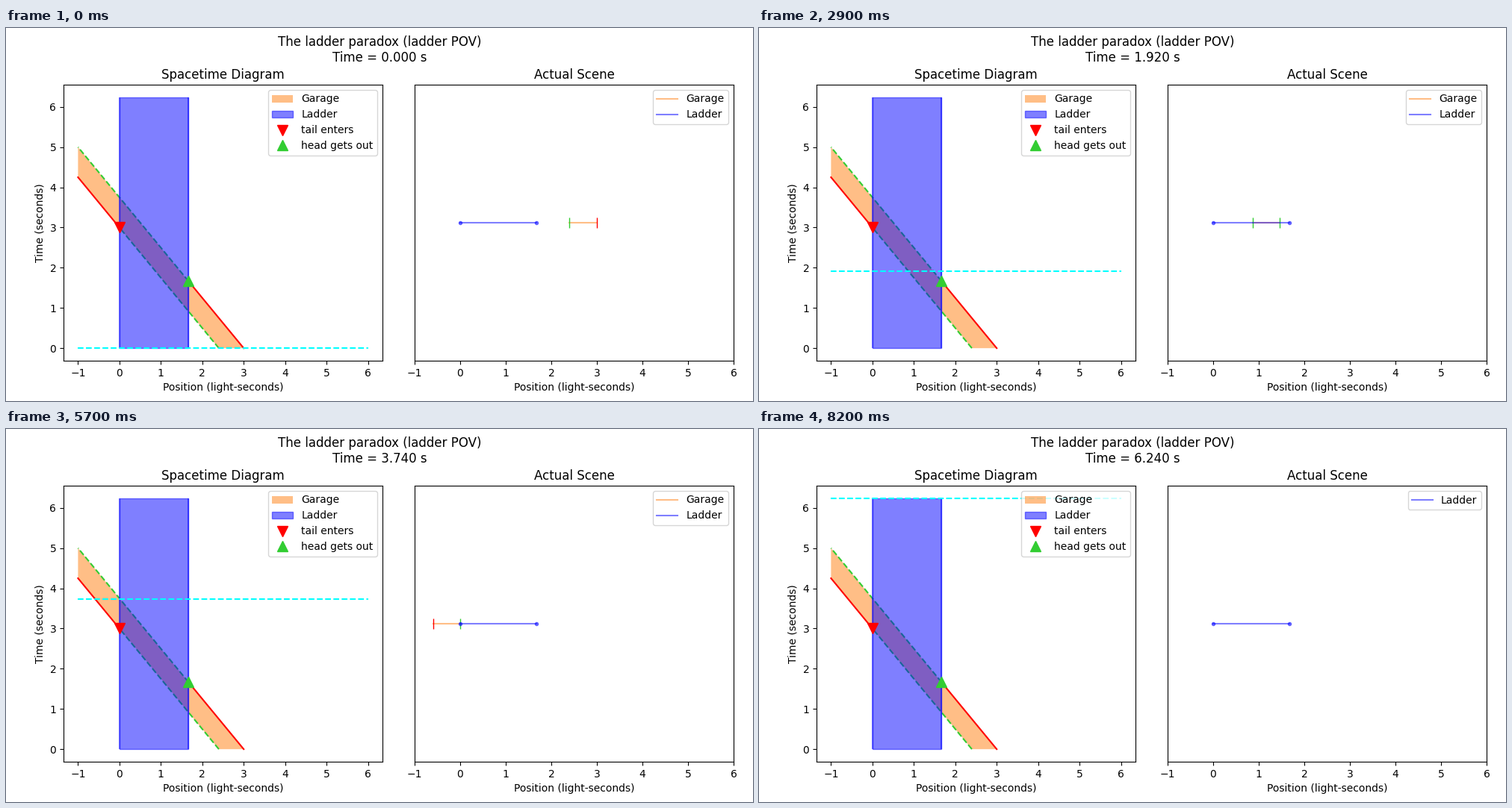
Recreate the animation shown at these times as a matplotlib script. Size 1000x500 px, loop 8220 ms.

```python
import matplotlib.pyplot as plt
from matplotlib.animation import FuncAnimation

W, H = 1000, 500
SPEED = 0.8
LADDER = 5 / 3            # ladder length at rest
ENTRY, EXIT = 2.4, 3.0    # garage doors at time zero
X_MIN, X_MAX = -1, 6
DT = 0.02
LAST = 312
HEAD_OUT, TAIL_IN = 83, 150   # steps at which the motion pauses
PAUSE = 49

GARAGE_COLOR = "tab:orange"
OPEN, SHUT = "limegreen", "red"

# Time step shown in every animation frame, with the two pauses
STEPS = sorted([*range(LAST + 1)] + [HEAD_OUT] * PAUSE + [TAIL_IN] * PAUSE)

plt.rcParams["font.family"] = "DejaVu Sans"
fig = plt.figure(figsize=(W / 100, H / 100), dpi=100)
heading = fig.suptitle("")


def panel(left, title):
    ax = fig.add_axes([left / W, 54 / H, 427 / W, 370 / H])
    ax.set_title(title, y=1.0)
    ax.set_xlabel("Position (light-seconds)")
    ax.set_xticks(range(X_MIN, X_MAX + 1))
    return ax


def event_marker(ax, x, y, shape, color, label):
    return ax.plot([x], [y], shape, color=color, markersize=10,
                   label=label, zorder=4)[0]


def freeze(axis):
    """Keep the laid-out ticks so that each redraw stays quick."""
    parts = [axis.label]
    for tick in axis.get_major_ticks():
        parts += [tick.tick1line, tick.label1]
    axis.draw = lambda renderer: [part.draw(renderer) for part in parts]


# Spacetime diagram
end = LAST * DT
diagram = panel(77, "Spacetime Diagram")
diagram.set_ylabel("Time (seconds)")
diagram.set_yticks(range(7))

entry_end = (ENTRY - X_MIN) / SPEED
exit_end = (EXIT - X_MIN) / SPEED
t_in = ENTRY / SPEED
t_out = (EXIT - LADDER) / SPEED

garage_area, = diagram.fill(
    [ENTRY, EXIT, X_MIN, X_MIN], [0, 0, exit_end, entry_end],
    facecolor=GARAGE_COLOR, edgecolor="none", alpha=0.5, label="Garage")
diagram.plot([ENTRY, 0], [0, t_in], "--", color=OPEN)
diagram.plot([0, X_MIN], [t_in, entry_end], color=SHUT)
diagram.plot([EXIT, LADDER], [0, t_out], color=SHUT)
diagram.plot([LADDER, X_MIN], [t_out, exit_end], "--", color=OPEN)
ladder_area, = diagram.fill(
    [0, LADDER, LADDER, 0], [0, 0, end, end],
    color="blue", alpha=0.5, label="Ladder", zorder=3)
for x in (0, LADDER):
    diagram.plot([x, x], [0, end], color="blue", alpha=0.5, zorder=3,
                 solid_capstyle="butt")
now_line, = diagram.plot([X_MIN, X_MAX], [0, 0], "--", color="cyan", zorder=3.5)
tail_mark = event_marker(diagram, 0, t_in, "v", SHUT, "tail enters")
head_mark = event_marker(diagram, LADDER, t_out, "^", OPEN, "head gets out")
diagram.set_xlim(-1.35, 6.35)
diagram.set_ylim(-0.05 * end, 1.05 * end)
diagram.legend(handles=[garage_area, ladder_area, tail_mark, head_mark],
               loc="upper right")

# Moving scene
scene = panel(547, "Actual Scene")
scene.set_yticks([])
garage, = scene.plot([], [], color=GARAGE_COLOR, alpha=0.5, label="Garage")
doors = [scene.plot([], [], "|", markersize=10)[0] for _ in range(2)]
ladder, = scene.plot([0, LADDER], [0, 0], color="blue", alpha=0.5,
                     label="Ladder", zorder=3)
scene.plot([0, LADDER], [0, 0], ".", color="blue", alpha=0.5, zorder=3)
events = {
    HEAD_OUT: event_marker(scene, LADDER, 0, "^", OPEN, "head gets out"),
    TAIL_IN: event_marker(scene, 0, 0, "v", SHUT, "tail enters"),
}
scene.set_xlim(X_MIN, X_MAX)
scene.set_ylim(-1, 1)

fig.draw_without_rendering()
for ax in (diagram, scene):
    freeze(ax.xaxis)
    freeze(ax.yaxis)

shown = []


def update(frame):
    step = STEPS[frame]
    t = step * DT
    heading.set_text(f"The ladder paradox (ladder POV)\nTime = {t:.3f} s")
    now_line.set_ydata([t, t])

    places = [ENTRY - SPEED * t, EXIT - SPEED * t]
    is_open = [step < TAIL_IN, step >= HEAD_OUT]
    for door, x, opened in zip(doors, places, is_open):
        door.set_data([x], [0])
        door.set_color(OPEN if opened else SHUT)
        door.set_visible(x > X_MIN - 1e-6)
    garage.set_data([max(x, X_MIN) for x in places], [0, 0])
    garage.set_visible(places[1] > X_MIN - 1e-6)
    for when, mark in events.items():
        mark.set_visible(step == when)

    rows = [a for a in (garage, ladder, *events.values()) if a.get_visible()]
    if rows != shown:
        shown[:] = rows
        scene.legend(handles=rows, loc="upper right")
    return []


anim = FuncAnimation(fig, update, frames=len(STEPS), interval=20,
                     repeat=True, repeat_delay=0)
plt.show()
```
